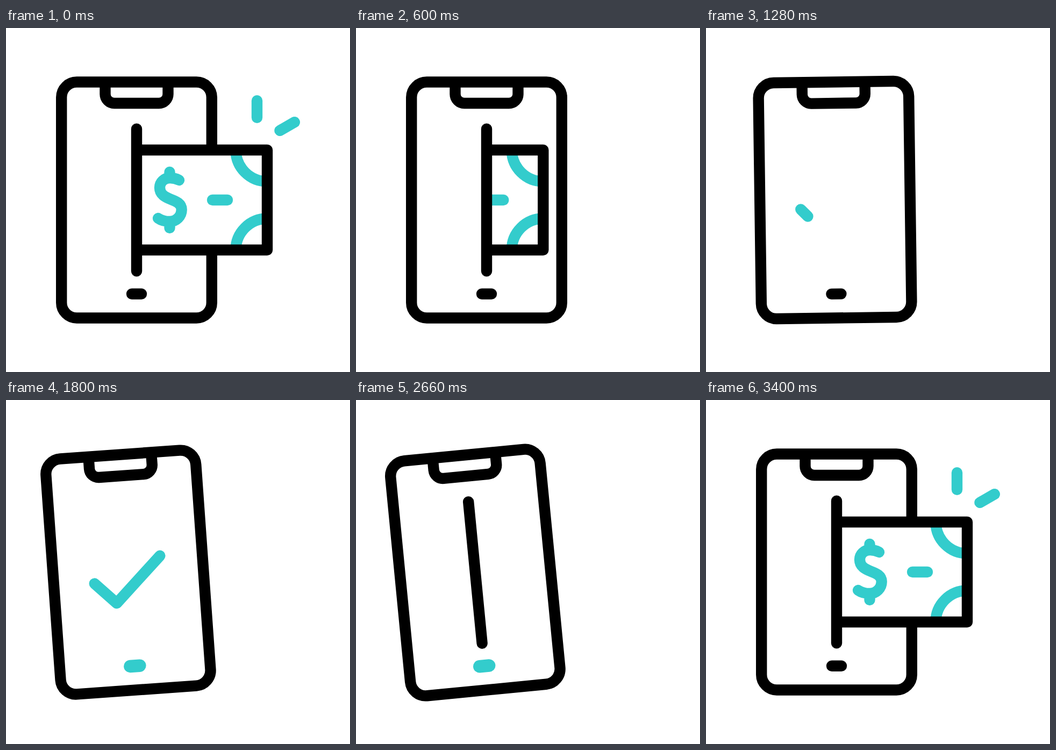
Animation, 640 px wide and 640 px high, one loop 3600 ms. Source, as an HTML page:

```html
<!DOCTYPE html>
<html lang="en">
<head>
<meta charset="utf-8">
<title>Mobile payment</title>
<style>
  html, body { margin: 0; width: 100%; height: 100%; overflow: hidden; background: #fff; }
  svg { display: block; width: 100vw; height: 100vh; fill: none; stroke: #000; stroke-width: 20.4; stroke-linecap: round; stroke-linejoin: round; }
  .teal { stroke: #33cccc; }
</style>
</head>
<body>
<svg viewBox="0 0 640 640">
  <clipPath id="slot"><rect x="243" y="150" width="390" height="340"/></clipPath>
  <clipPath id="paper"><rect x="150" y="227" width="336" height="186"/></clipPath>
  <g id="phone">
    <rect x="103.2" y="100.5" width="279.6" height="439" rx="28.5"/>
    <path d="M184.5 100.5V123a17 17 0 0 0 17 17h83a17 17 0 0 0 17-17V100.5" stroke-linecap="butt"/>
    <path id="button" d="M234 494.7h18"/>
    <path id="check" class="teal" d="M179 336.5L217.6 375.8L304 293.5" pathLength="100"/>
    <g clip-path="url(#slot)">
      <g id="bill">
        <rect x="150" y="227" width="336" height="186" fill="#fff" stroke="none"/>
        <g class="teal" clip-path="url(#paper)">
          <circle cx="486" cy="227" r="58.5"/>
          <circle cx="486" cy="413" r="58.5"/>
          <path d="M384 320h28"/>
          <path d="M304.5 268v11M304.5 361v11M322 283C316 280 311 279 305 279C294 279 286 287 286 297C286 310 297 315 306 318.5C315 322 326.7 326 326.7 338C326.7 350 317 360 304.5 360C296 360 288 357.5 283 354"/>
        </g>
        <rect x="150" y="227" width="336" height="186"/>
      </g>
    </g>
    <path id="slider"/>
  </g>
  <g id="rays" class="teal"><path/><path/></g>
</svg>
<script>
const LOOP = 3600;
const $ = id => document.getElementById(id);
const [rayUp, raySide] = $('rays').children;

// Eased value from [time, value] keys
function track(t, keys) {
  if (t <= keys[0][0]) return keys[0][1];
  for (let i = 1; i < keys.length; i++) {
    const [t0, v0] = keys[i - 1], [t1, v1] = keys[i];
    if (t < t1) {
      const u = (t - t0) / (t1 - t0);
      return v0 + (v1 - v0) * u * u * (3 - 2 * u);
    }
  }
  return keys[keys.length - 1][1];
}

const SWING = [0, -6, 6, -6, 6, -6, 0].map((angle, i) => [694 + 403 * i, angle]);
const BILL = [[0, 0], [400, 22], [800, -295], [2600, -295], [3100, 22], [3400, 0]];
const SLIDER = [[800, 132.3], [1200, 0], [2200, 0], [2600, 132.3]];
const RAYS = [[0, 1], [400, 0], [2800, 0], [3200, 1]];
const CHECK_END = [[1200, 0], [1600, 100]];
const CHECK_START = [[2000, 0], [2400, 100]];

const show = (el, on) => el.setAttribute('visibility', on ? 'visible' : 'hidden');

function draw(t) {
  $('phone').setAttribute('transform', `rotate(${track(t, SWING)} 243 539)`);
  $('bill').setAttribute('transform', `translate(${track(t, BILL)} 0)`);

  const half = track(t, SLIDER);
  $('slider').setAttribute('d', `M243 ${320 - half}V${320 + half}`);
  show($('slider'), half > 0);

  const grow = track(t, RAYS);
  rayUp.setAttribute('d', `M467 166.7v${-31.5 * grow}`);
  raySide.setAttribute('d', `M509.5 190.8l${27.3 * grow} ${-15.6 * grow}`);
  show($('rays'), grow > 0);

  const from = track(t, CHECK_START), length = track(t, CHECK_END) - from;
  $('check').setAttribute('stroke-dasharray', `${length} 200`);
  $('check').setAttribute('stroke-dashoffset', -from);
  show($('check'), length > 0);

  const lit = (t >= 1540 && t < 2080) || (t >= 2660 && t < 3220);
  $('button').setAttribute('class', lit ? 'teal' : '');
  $('button').setAttribute('stroke-width', lit ? 23.5 : 20.4);
}

function tick() {
  draw(performance.now() % LOOP);
  requestAnimationFrame(tick);
}
tick();
</script>
</body>
</html>
```
